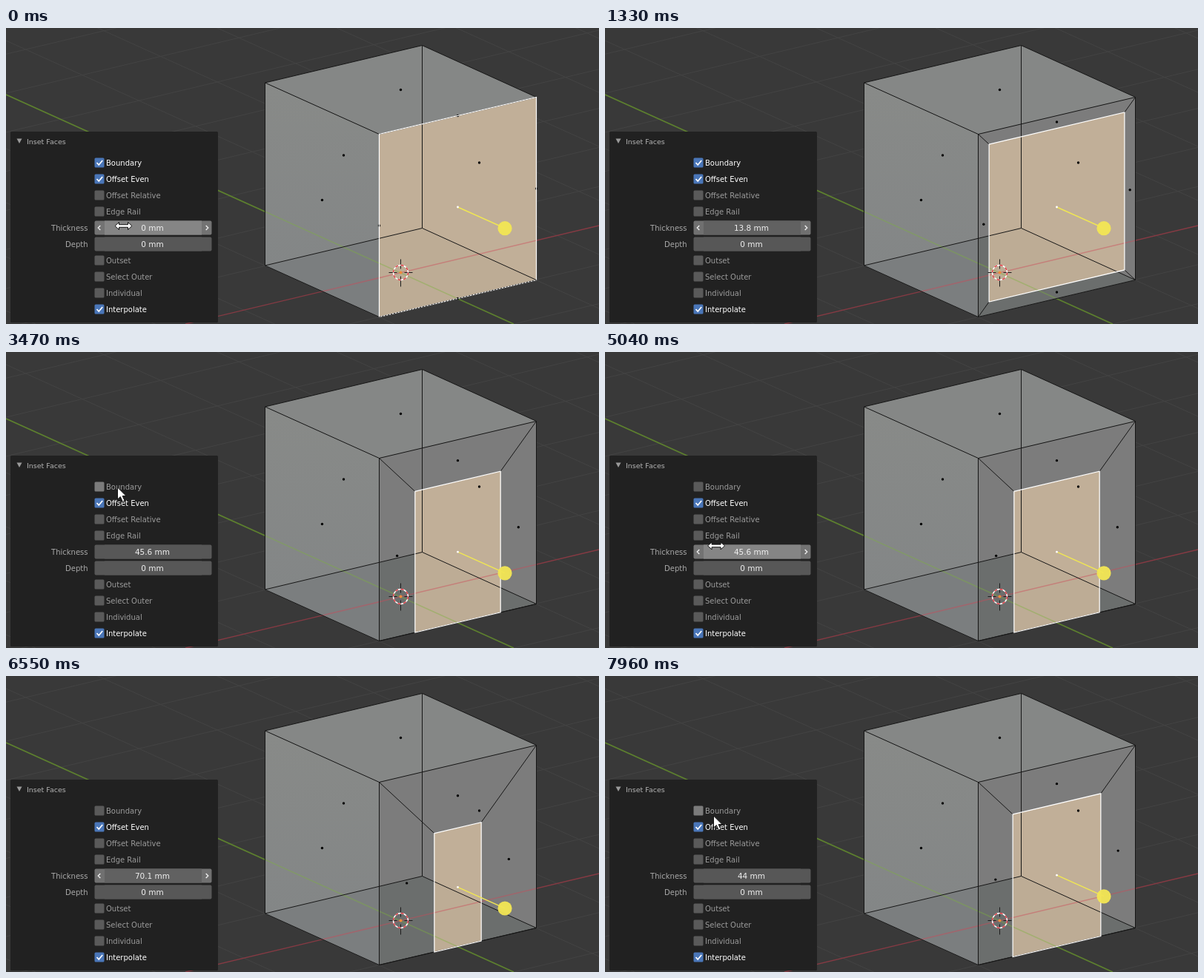
An HTML page for the animation above (8000 ms loop, 800 by 400 pixels).

```html
<!DOCTYPE html>
<html lang="en">
<head>
<meta charset="utf-8">
<title>Inset Faces</title>
<style>
  html, body { margin: 0; width: 800px; height: 400px; overflow: hidden; background: #393939; }
  svg { display: block; }
  text { font: 10px "DejaVu Sans", sans-serif; fill: #9c9c9c; }
  .title { font-size: 9.5px; fill: #b4b4b4; }
  .side { text-anchor: end; fill: #a8a8a8; }
  .value { font-size: 10.5px; text-anchor: middle; fill: #eee; }
  .on text { fill: #fff; }
  .box { fill: #5a5a5a; }
  .on .box { fill: #4a76b8; }
  .hover:not(.on) .box { fill: #7b7b7b; }
  .tick { fill: none; stroke: #fff; stroke-width: 1.7; visibility: hidden; }
  .on .tick { visibility: visible; }
  .grid { stroke: #434343; }
  .edge { fill: none; stroke: #161616; }
  .field .side-zone, .field .mid-zone { fill: #575757; }
  .field.hover .side-zone { fill: #737373; }
  .field.hover .mid-zone { fill: #858585; }
  .field.drag .side-zone { fill: #707070; }
  .field.drag .mid-zone { fill: #616161; }
  .chevron { fill: none; stroke: #eee; stroke-width: 1.4; visibility: hidden; }
  .hover .chevron, .drag .chevron { visibility: visible; }
  .pointer { fill: #fff; stroke: #111; stroke-linejoin: round; }
</style>
</head>
<body>
<svg width="800" height="400" viewBox="0 0 800 400">
  <defs>
    <clipPath id="cubeClip"><path d="M349.5 74L561.5 23.5L715.5 93.5V340.5L503.5 390.5L349.5 321Z"/></clipPath>
    <linearGradient id="leftShade" x1="0" y1="0" x2="0" y2="1">
      <stop stop-color="#888a88"/><stop offset="1" stop-color="#828586"/>
    </linearGradient>
  </defs>
  <rect width="800" height="400" fill="#393939"/>
  <g id="grid" class="grid"></g>
  <path d="M0 90L685 400" stroke="#5d802e" stroke-width="1.7"/>
  <path d="M242 400L800 267" stroke="#863a43" stroke-width="1.4"/>

  <path d="M349.5 74L561.5 23.5L715.5 93.5L503.5 143.5Z" fill="#858786"/>
  <path d="M349.5 74L503.5 143.5V390.5L349.5 321Z" fill="url(#leftShade)"/>
  <path d="M349.5 321L503.5 284.5V390.5Z" fill="#7b7e7f"/>
  <path d="M503.5 143.5L715.5 93.5V340.5L503.5 390.5Z" fill="#7c7c7c"/>
  <path d="M503.5 284.5L561.5 270.5L715.5 340.5L503.5 390.5Z" fill="#6b6e6d"/>
  <polygon id="face" fill="rgba(210,188,159,.8)"/>
  <g clip-path="url(#cubeClip)" stroke-width="1.5">
    <path d="M0 90L685 400" stroke="rgba(124,176,60,.42)"/>
    <path d="M242 400L800 267" stroke="rgba(205,72,88,.45)"/>
  </g>
  <path class="edge" d="M561.5 23.5V270.5L349.5 321M561.5 270.5L715.5 340.5"/>
  <path class="edge" d="M349.5 74L561.5 23.5L715.5 93.5V340.5L503.5 390.5L349.5 321ZL503.5 143.5L715.5 93.5M503.5 143.5V390.5"/>
  <path id="spokes" class="edge"/>
  <g id="dots"></g>
  <polygon id="outline" fill="none" stroke="#fff" stroke-width="1.2"/>
  <path id="dashes" d="M503.5 390.5L715.5 340.5" stroke="#222" stroke-dasharray="2 2"/>

  <g transform="translate(532.5 330.5)" fill="none">
    <path d="M-16 0H-5M5 0H16M0 -18V-5M0 5V19" stroke="#1c1c1c"/>
    <circle r="10" stroke="#fff" stroke-width="1.4"/>
    <circle r="10" stroke="#e0323c" stroke-width="1.4" stroke-dasharray="3.93 3.92"/>
    <circle r="2" fill="#f08a3c"/>
  </g>
  <g id="normal">
    <path d="M0 0L63.5 28.5" stroke="#f0e752" stroke-width="1.5"/>
    <circle cx="63.5" cy="28.7" r="9.6" fill="#f1e554" fill-opacity=".96"/>
    <circle r="1.4" fill="#fff"/>
  </g>

  <rect x="6" y="140" width="280" height="258" rx="1.5" fill="#212121"/>
  <path d="M14.5 149.5H21.5L18 156Z" fill="#9a9a9a"/>
  <text class="title" x="28" y="156.5">Inset Faces</text>
  <g id="panel"></g>

  <path id="arrow" class="pointer" d="M0 0V16L3.8 12.6L6.8 19.3L9.6 18L6.7 11.6H11.6Z"/>
  <path id="slide" class="pointer" d="M-11.5 0L-6 -5V-1.8H6V-5L11.5 0L6 5V1.8H-6V5Z"/>
</svg>
<script>
const LOOP = 8000, STEP = 60, SIDE = 200;
const $ = id => document.getElementById(id);
const mix = (a, b, p) => a + (b - a) * p;
const mean = pts => [0, 1].map(i => pts.reduce((s, p) => s + p[i], 0) / pts.length);

function add(parent, tag, attrs, text) {
  const el = document.createElementNS('http://www.w3.org/2000/svg', tag);
  for (const k in attrs) el.setAttribute(k, attrs[k]);
  if (text) el.textContent = text;
  return parent.appendChild(el);
}

// Floor grid, parallel to the two axes
for (let i = -14; i <= 14; i++) {
  if (!i) continue;
  add($('grid'), 'path', { d: `M0 ${90 + 73 * i}l800 362` });
  add($('grid'), 'path', { d: `M0 ${457.7 + 52.8 * i}l800 -190.7` });
}

// Panel rows
function checkbox(y, label, on) {
  const g = add($('panel'), 'g', { class: on ? 'on' : '' });
  add(g, 'rect', { class: 'box', x: 119.5, y: y - 6.5, width: 13, height: 13, rx: 1.5 });
  add(g, 'path', { class: 'tick', d: `M122.5 ${y}l2.7 3l5 -6` });
  add(g, 'text', { x: 135, y: y + 4 }, label);
  return { g, y };
}

function field(y, label) {
  const g = add($('panel'), 'g', { class: 'field' });
  add(g, 'text', { class: 'side', x: 110.5, y: y + 4 }, label);
  add(g, 'rect', { class: 'side-zone', x: 119.5, y: y - 9.5, width: 158, height: 19, rx: 2 });
  add(g, 'rect', { class: 'mid-zone', x: 133, y: y - 9.5, width: 131, height: 19 });
  add(g, 'path', { class: 'chevron', d: `M127.3 ${y - 3}l-3 3l3 3M269.7 ${y - 3}l3 3l-3 3` });
  return { g, y, value: add(g, 'text', { class: 'value', x: 197.5, y: y + 4 }, '0 mm') };
}

const boxes = [
  ['Boundary', 182, 1], ['Offset Even', 204, 1], ['Offset Relative', 226], ['Edge Rail', 248],
  ['Outset', 314], ['Select Outer', 336], ['Individual', 358], ['Interpolate', 380, 1],
].map(([label, y, on]) => checkbox(y, label, on));
const thickness = field(270, 'Thickness');
field(292, 'Depth');

// Thickness in mm over time, a smooth curve through the keys of each drag
const drags = [
  [[310, 0], [1150, 9.5], [1330, 13.8], [1990, 39.9], [2230, 45.6]],
  [[5560, 45.6], [6010, 57.4], [6370, 67], [6720, 71], [7150, 62.8], [7210, 58.9], [7510, 44]],
];

function slope(keys, i) {
  const a = keys[i - 1], b = keys[i + 1];
  return a && b ? (b[1] - a[1]) / (b[0] - a[0]) : 0;
}

function curve(keys, t) {
  if (t <= keys[0][0]) return keys[0][1];
  const i = keys.findIndex(k => k[0] > t);
  if (i < 0) return keys[keys.length - 1][1];
  const [t0, v0] = keys[i - 1], [t1, v1] = keys[i], h = t1 - t0, p = (t - t0) / h, q = 1 - p;
  return q * q * (1 + 2 * p) * v0 + p * p * (3 - 2 * p) * v1 +
    h * p * q * (q * slope(keys, i - 1) - p * slope(keys, i));
}

function thicknessAt(t) {
  const q = Math.floor((t - 10) / STEP) * STEP + 10;
  return curve(drags[t < 5000 ? 0 : 1], q);
}

// Pointer moves: start, steps, end point
const moves = [[2480, 12, 150.5, 183], [4740, 8, 150, 276.5], [7720, 5, 146.5, 189]];
const dragging = t => (t >= 120 && t < 2280) || (t >= 5350 && t < 7570);

function pointerAt(t) {
  let x = 158.5, y = 267.5;
  for (const [start, n, ex, ey] of moves) {
    if (t < start) break;
    const p = Math.min(n, Math.floor((t - start) / STEP) + 1) / n, e = p * p * (3 - 2 * p);
    x = mix(x, ex, e);
    y = mix(y, ey, e);
  }
  return [x, y];
}

// Front face: u runs right, v runs down
const onFace = (u, v) => [503.5 + 212 * u, 143.5 - 50 * u + 247 * v];
const outer = [onFace(0, 0), onFace(1, 0), onFace(1, 1), onFace(0, 1)];
const dot = (x, y) => add($('dots'), 'circle', { cx: x, cy: y, r: 1.7, fill: '#000' });
[[532.5, 83.5], [455.5, 172], [426.5, 232.5], [638.5, 182]].forEach(p => dot(...p));
const sideDots = outer.map(() => dot(0, 0));

function drawMesh(mm, boundary) {
  const a = mm / SIDE, b = boundary ? 1 - a : 1;
  const inner = [onFace(a, a), onFace(1 - a, a), onFace(1 - a, b), onFace(a, b)];
  $('face').setAttribute('points', inner.join(' '));
  $('outline').setAttribute('points', inner.join(' '));
  $('spokes').setAttribute('d', outer.map((p, i) => `M${p}L${inner[i]}`).join(''));
  sideDots.forEach((el, i) => {
    const j = (i + 1) % 4, [x, y] = mean([outer[i], outer[j], inner[i], inner[j]]);
    el.setAttribute('cx', x);
    el.setAttribute('cy', y);
  });
  sideDots[2].style.display = boundary ? '' : 'none';
  $('dashes').style.display = mm ? 'none' : '';
  $('normal').setAttribute('transform', `translate(${mean(inner)})`);
}

function drawPanel(t, mm, boundary) {
  const drag = dragging(t), [x, y] = pointerAt(t);
  const over = row => !drag && Math.abs(y - row.y) <= 10;
  const slide = over(thickness);
  thickness.value.textContent = `${+mm.toFixed(1)} mm`;
  thickness.g.setAttribute('class', 'field' + (drag ? ' drag' : slide ? ' hover' : ''));
  boxes[0].g.classList.toggle('on', boundary);
  boxes.forEach(row => row.g.classList.toggle('hover', over(row)));
  for (const [id, shown] of [['slide', slide], ['arrow', !drag && !slide]]) {
    $(id).style.display = shown ? '' : 'none';
    $(id).setAttribute('transform', `translate(${x} ${y})`);
  }
}

function frame() {
  const t = performance.now() % LOOP, mm = thicknessAt(t), boundary = t < 3470;
  drawMesh(mm, boundary);
  drawPanel(t, mm, boundary);
  requestAnimationFrame(frame);
}
frame();
</script>
</body>
</html>
```
